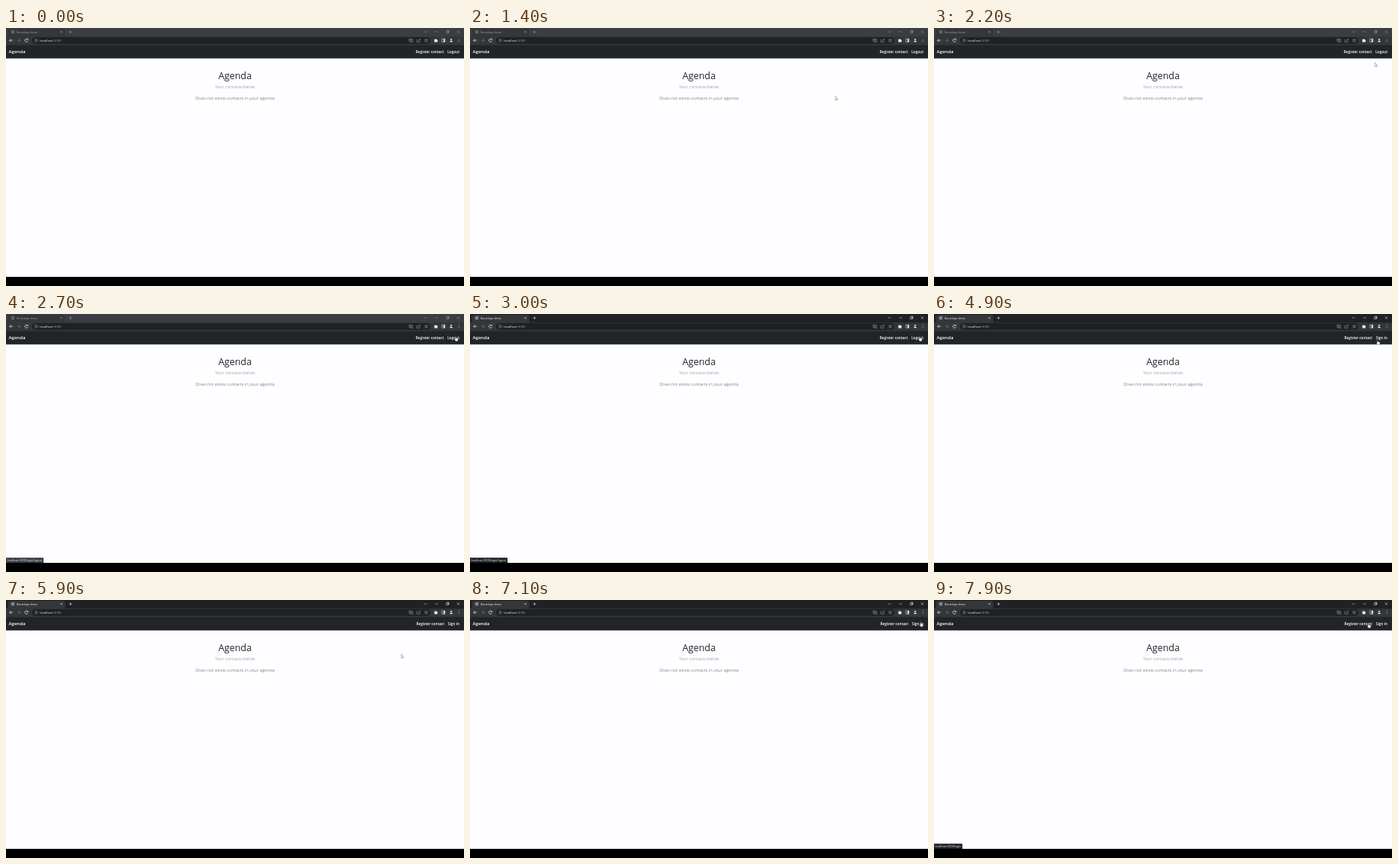
Recreate the animation shown at these times as an HTML page. Size 600 by 338 pixels, loop 8 s.

```html
<!DOCTYPE html>
<html lang="en">
<head>
<meta charset="utf-8">
<title>Agenda</title>
<style>
html, body { margin: 0; height: 100%; overflow: hidden; background: #000; }
svg { display: block; width: 100vw; height: 100vh; font-family: "Open Sans", "Noto Sans", sans-serif; }
.icon { fill: none; stroke: #e8eaed; stroke-width: .55; }
.nav { font-size: 4.72px; font-weight: 600; fill: #fff; }
.light { font-size: 5.8px; font-weight: 300; text-anchor: middle; }
.status text { font-size: 3.6px; fill: #e8eaed; }

.frame, .status, .controls, .before, .after, .out, .in, .arrow, .hand, .cursor {
  animation: 8s step-end infinite;
}
.frame, .status { animation-name: frame; }
.controls { animation-name: controls; }
.before { animation-name: before; }
.after { animation-name: after; }
.out { animation-name: out; }
.in { animation-name: in; }
.arrow { animation-name: arrow; }
.hand { animation-name: hand; }
.cursor { animation-name: move; }

/* window gains focus */
@keyframes frame { 0% { color: #3c3d42; } 37.5%, 100% { color: #202124; } }
@keyframes controls { 0% { color: #a0a2a6; } 37.5%, 100% { color: #f1f3f4; } }

/* session ends */
@keyframes before { 0% { opacity: 1; } 41.25%, 100% { opacity: 0; } }
@keyframes after { 0% { opacity: 0; } 41.25%, 100% { opacity: 1; } }

/* link address bubbles */
@keyframes out {
  0% { opacity: 0; } 32.5% { opacity: .7; } 33.75% { opacity: 1; }
  45% { opacity: .55; } 46.25%, 100% { opacity: 0; }
}
@keyframes in { 0% { opacity: 0; } 97.5% { opacity: .6; } 98.75%, 100% { opacity: 1; } }

/* pointer shape */
@keyframes arrow {
  0% { opacity: 0; } 2.5% { opacity: 1; } 30% { opacity: 0; }
  62.5% { opacity: 1; } 82.5%, 100% { opacity: 0; }
}
@keyframes hand {
  0% { opacity: 0; } 30% { opacity: 1; } 62.5% { opacity: 0; } 82.5%, 100% { opacity: 1; }
}

/* pointer path, one step every 100 ms */
@keyframes move {
  0% { transform: translate(153px, 154px); }
  6.25% { transform: translate(153px, 154px); animation-timing-function: steps(9, start); }
  17.5% { transform: translate(461px, 96px); animation-timing-function: steps(3, start); }
  21.25% { transform: translate(512px, 75px); animation-timing-function: steps(6, start); }
  28.75% { transform: translate(577px, 45px); animation-timing-function: steps(2, start); }
  31.25% { transform: translate(590px, 31px); }
  32.5% { transform: translate(587px, 29px); }
  61.25% { transform: translate(587px, 29px); animation-timing-function: steps(9, start); }
  72.5% { transform: translate(514px, 70.5px); animation-timing-function: steps(2, start); }
  75% { transform: translate(517.3px, 70.5px); animation-timing-function: steps(7, start); }
  83.75% { transform: translate(583.5px, 29.5px); animation-timing-function: steps(3, start); }
  87.5% { transform: translate(593px, 37px); animation-timing-function: steps(2, start); }
  90% { transform: translate(588.3px, 28.3px); animation-timing-function: steps(4, start); }
  95% { transform: translate(587px, 29px); }
  96.25% { transform: translate(587px, 29px); animation-timing-function: steps(2, start); }
  98.75%, 100% { transform: translate(567px, 30px); }
}
</style>
</head>
<body>
<svg viewBox="0 0 600 338" preserveAspectRatio="none">
  <!-- tab strip -->
  <rect class="frame" width="600" height="12" fill="currentColor"/>
  <path d="M0 11.2Q2.5 11.2 2.5 8.7V3.5Q2.5 1 5 1H75Q77.500 1 77.500 3.5V8.700Q77.500 11.200 80 11.200H600V23H0Z" fill="#35363a"/>
  <g class="controls icon" style="stroke:currentColor">
    <circle cx="9" cy="5.2" r="1.9"/>
    <path d="M7.300 4.500L9 5.200L8.300 6.900M9.500 3.500L10.700 5"/>
    <path d="M71.300 4l2.400 2.400m0-2.400l-2.400 2.400M82.500 5.200h4m-2-2v4"/>
    <path d="M547.900 4.200l1.600 1.600l1.600-1.600M562.500 5h3.200M577 4h2.500v2.500h-2.500zM577.800 4v-.8h2.500v2.500h-.8M591 3.500l3 3m0-3l-3 3"/>
    <text x="14" y="6.5" font-size="3.6" fill="currentColor" stroke="none">Bootstrap demo</text>
  </g>

  <!-- toolbar -->
  <rect x="34" y="12" width="522" height="8.700" rx="4.350" fill="#202124"/>
  <g class="icon">
    <path d="M9 16.200H4.600M6.600 14.200l-2 2l2 2" stroke-width=".7"/>
    <path d="M14.500 16.200h4.400m-2-2l2 2l-2 2" stroke="#85878b"/>
    <path d="M28.200 15A2 2 0 1 0 28.600 16.700M28.700 13.900v1.500h-1.500" stroke-width=".7"/>
    <g stroke="#bdc1c6" stroke-width=".45">
      <circle cx="39.600" cy="16.200" r="1.900"/>
      <path d="M39.600 15.900v1.300m0-2.200v.4"/>
      <path d="M528.200 14.200h2.600v3.400h-2.600zM530.800 15h2v3.400h-2.600M528.700 15.900h1.500"/>
      <path d="M539 15.200h-.8v3.200h4v-1.400M539.800 17q.2-2 2.800-2m-1-1.200l1.200 1.200l-1.200 1.200"/>
      <path d="M550.500 14l.65 1.400l1.550.2l-1.150 1.050l.3 1.550l-1.350-.75l-1.350.75l.3-1.550l-1.150-1.050l1.550-.2z"/>
    </g>
    <path d="M571 14.200h4v4h-4z"/>
  </g>
  <g fill="#e8eaed">
    <path d="M561 15h1.200a.8 .8 0 0 1 1.600 0h1.200v1.200a.8 .8 0 0 1 0 1.600v.800h-4v-1.200a.6 .6 0 0 0 0-1.200z"/>
    <path d="M573.200 14.200h1.800v4h-1.800z"/>
    <circle cx="583.200" cy="15.100" r="1.050"/>
    <path d="M581.200 18.300q0-1.700 2-1.700t2 1.700z"/>
    <circle cx="593.200" cy="14.600" r=".45"/>
    <circle cx="593.200" cy="16.200" r=".45"/>
    <circle cx="593.200" cy="17.800" r=".45"/>
    <text x="44.200" y="17.700" font-size="4.200">localhost<tspan fill="#9aa0a6">:3000</tspan></text>
  </g>

  <!-- page -->
  <rect y="22.500" width="600" height="17.300" fill="#212529"/>
  <rect y="39.800" width="600" height="286.200" fill="#fefdff"/>
  <text class="nav" x="3.600" y="33.400" style="font-size:6px">Agenda</text>
  <g class="nav" text-anchor="end">
    <g class="before"><text x="573.500" y="32.800">Register contact</text><text x="594" y="32.800">Logout</text></g>
    <g class="after"><text x="574.200" y="32.800">Register contact</text><text x="594" y="32.800">Sign in</text></g>
  </g>
  <text x="300" y="67.200" font-size="12.400" font-weight="500" text-anchor="middle" fill="#212529">Agenda</text>
  <text class="light" x="300" y="79.400" fill="#6c757d">Your contacts below</text>
  <text class="light" x="300" y="93.900" fill="#45494d">Does not exists contacts in your agenda</text>

  <g class="out"><g class="status">
    <path d="M0 319.200H48.200Q49.200 319.200 49.200 320.200V326H0Z" fill="currentColor"/>
    <text x="1.500" y="323.900">localhost:3000/login/logout</text>
  </g></g>
  <g class="in"><g class="status">
    <path d="M0 319.200H36.200Q37.200 319.200 37.200 320.200V326H0Z" fill="currentColor"/>
    <text x="1.500" y="323.900">localhost:3000/login</text>
  </g></g>

  <g class="cursor" fill="#fff" stroke-linejoin="round">
    <path class="arrow" d="M.300 .300V5.300L1.500 4.200L2.300 6L3.100 5.700L2.300 3.900H3.900Z" stroke="#555" stroke-width=".4"/>
    <path class="hand" d="M1.600 4.200V.8Q2.100 0 2.600 .8V2.500L4.900 3Q5.500 3.200 5.400 4L4.900 6.800H2.100L.400 4.300Q.600 3.500 1.600 4.200Z" stroke="#111" stroke-width=".4"/>
  </g>
</svg>
</body>
</html>
```
